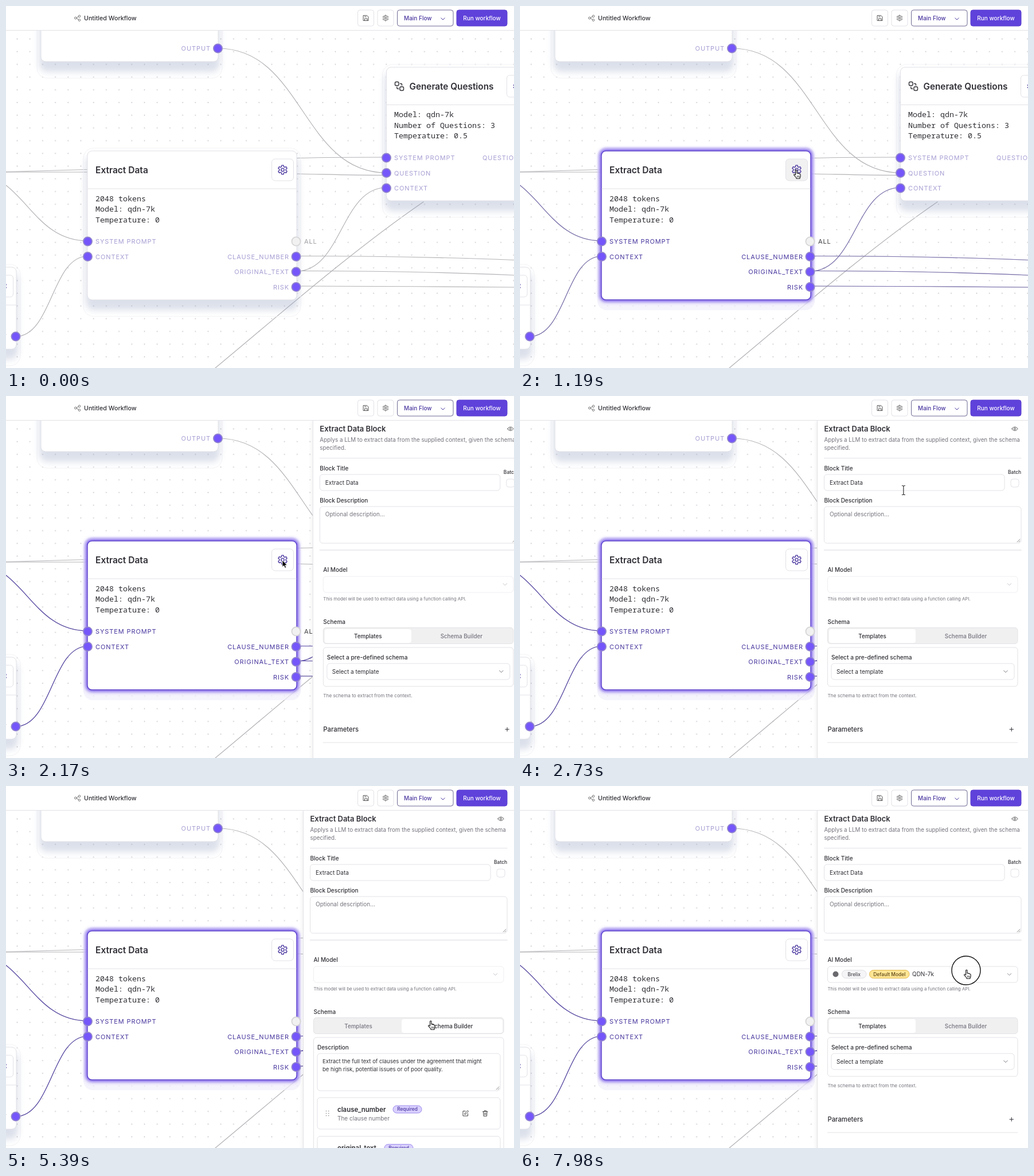
These frames come from a looping animation (886x632 px, 8 s). An HTML page:

```html
<!DOCTYPE html>
<html lang="en">
<head>
<meta charset="utf-8">
<title>Workflow editor</title>
<style>
  html, body { margin: 0; width: 100%; height: 100%; overflow: hidden; background: #fff; }
  svg { display: block; width: 100%; height: 100%; font-family: Inter, sans-serif; }
  .mono { font: 13.33px "Noto Sans Mono", monospace; }
  .label { font-size: 11px; letter-spacing: .9px; }
  .line { fill: none; stroke-linecap: round; stroke-linejoin: round; }
</style>
</head>
<body>
<svg id="stage" viewBox="0 0 886 632" preserveAspectRatio="none"></svg>
<script>
const INK = '#2f2f36', GREY = '#74747e', BORDER = '#e2e2e8', VIOLET = '#4b379f';
const PALE_LABEL = [167, 158, 211], DARK_LABEL = [73, 54, 158];

// ---- drawing helpers ----
const text = (x, y, str, size = 10, weight = 400, fill = INK, anchor = 'start') =>
  `<text x="${x}" y="${y}" font-size="${size}" font-weight="${weight}" fill="${fill}" text-anchor="${anchor}">${str}</text>`;
const box = (x, y, x2, y2, r = 5, fill = '#fff', stroke = BORDER, extra = '') =>
  `<rect x="${x}" y="${y}" width="${x2 - x}" height="${y2 - y}" rx="${r}" fill="${fill}" stroke="${stroke}" ${extra}/>`;
const line = (d, stroke = INK, width = 1.1, extra = '') =>
  `<path class="line" d="${d}" stroke="${stroke}" stroke-width="${width}" ${extra}/>`;
const circle = (x, y, r, fill, stroke = 'none', width = 1) =>
  `<circle cx="${x}" cy="${y}" r="${r}" fill="${fill}" stroke="${stroke}" stroke-width="${width}"/>`;
const rule = (x, x2, y, color = BORDER, width = 1) => line(`M${x} ${y}H${x2}`, color, width);
const chevron = (x, y, color = GREY) => line(`M${x - 3.2} ${y - 1.6}l3.2 3.2l3.2-3.2`, color, 1);
const resizer = (x, y) => line(`M${x - 5} ${y}l5-5M${x - 2} ${y}l2-2`, '#777', .8);
const handle = (x, y) => circle(x, y, 7.6, '#7556fa', '#9287cc', 1.8);
const label = (x, y, str, anchor = 'start') =>
  `<text class="label" x="${x}" y="${y + 4}" text-anchor="${anchor}">${str}</text>`;
const mono = (x, y, rows) =>
  rows.map((row, i) => `<text class="mono" x="${x}" y="${y + i * 18.6}" fill="#303036">${row}</text>`).join('');

function gear(cx, cy, r, color, width) {
  const points = [];
  for (let tooth = 0; tooth < 6; tooth++) {
    for (const [offset, k] of [[-.36, .72], [-.2, 1], [.2, 1], [.36, .72]]) {
      const a = tooth * Math.PI / 3 - Math.PI / 2 + offset;
      points.push((cx + r * k * Math.cos(a)).toFixed(2) + ' ' + (cy + r * k * Math.sin(a)).toFixed(2));
    }
  }
  return line('M' + points.join('L') + 'Z', color, width) + circle(cx, cy, r * .33, 'none', color, width);
}

const shadow = (x, y, x2, y2) =>
  box(x - 7, y - 5, x2 + 7, y2 + 29, 18, 'none', '#f4f4f8') +
  box(x - 3, y + 8, x2 + 3, y2 + 18, 14, '#8c9abb', 'none', 'opacity=".3" filter="url(#soft)"');
const node = (x, y, x2, y2) => shadow(x, y, x2, y2) + box(x, y, x2, y2, 8);

// ---- workflow canvas ----
const plainEdges = [
  'M370 74C517 74 517 291 663 291',
  'M0 289.5L142 285.5L507 265.5C560 264.3 610 264 663 264',
  'M0 290H142L507 293C560 294 600 295.5 660 295.5',
  'M365 632C470 545 600 430 728 342',
];
const nodeEdges = [
  'M0 313C45 348 70 410 142 410',
  'M17 577C80 577 80 437 142 437',
  'M507 436.5C650 436.5 750 438 886 443.5',
  'M507 462.5C650 462.5 750 464 886 470',
  'M507 463C585 463 585 317 663 317',
  'M507 489C650 489 750 490 886 491',
];
const edgeGroup = (paths, color) => paths.map(d => line(d, color, 1.2)).join('');

const canvas = `
  <rect width="886" height="632" fill="url(#dots)"/>
  ${edgeGroup([...plainEdges, ...nodeEdges], '#b3b3b7')}
  <g id="hotEdges">${edgeGroup(nodeEdges, '#5a4aa9')}</g>
  ${node(61, -60, 370, 97)}
  ${node(-200, 456, 18, 599)}
  ${rule(0, 18, 522)}${box(-20, 470, 12.5, 508)}
  ${line('M0 486v1M0 491v1', VIOLET, 1.6)}
  ${node(663.5, 107, 960, 340)}
  ${rule(664, 886, 172.5)}${box(873.5, 121, 912, 159)}
  ${line('M885.5 138v.5M885.5 142v.5', VIOLET, 1.6)}
  ${box(678.5, 132.5, 685, 139, 2, 'none', INK, 'stroke-width="1.4"')}
  ${box(687, 141, 693.5, 147.5, 2, 'none', INK, 'stroke-width="1.4"')}
  ${line('M687.5 135.5h1.5q1.5 0 1.5 1.5v1.5M681.8 141.5v1.5q0 1.500 1.500 1.500h1.500', INK, 1.4)}
  ${text(703.5, 145.5, 'Generate Questions', 15.3, 600)}
  ${mono(677, 194, ['Model: qdn-7k', 'Number of Questions: 3', 'Temperature: 0.5'])}
  <g fill="rgb(${PALE_LABEL})">
    ${label(357, 74, 'OUTPUT', 'end')}${label(-6, 577, 'T')}
    ${label(677, 265, 'SYSTEM PROMPT')}${label(677, 291.5, 'QUESTION')}
    ${label(677, 318, 'CONTEXT')}${label(831, 265, 'QUESTIONS')}
  </g>
  ${handle(369.5, 74)}${handle(17, 577)}
  ${handle(663.5, 265)}${handle(663.5, 291.5)}${handle(663.5, 318)}

  <g id="restShadow">${shadow(142, 253, 507, 513)}</g>
  <g id="glow">
    ${box(135, 246, 514, 531, 16, '#f1eefb', 'none', 'opacity=".7"')}
    ${box(139, 250, 510, 516, 10, '#6a4be6', 'none', 'filter="url(#halo)"')}
  </g>
  ${box(142, 253, 507, 513, 8)}
  <g id="hotBorder">${box(142, 253, 507, 513, 8, 'none', '#5b3fce', 'stroke-width="1.4"')}</g>
  ${rule(143, 506, 319)}
  ${text(156, 291.5, 'Extract Data', 15.5, 600)}
  <g id="gearButton">${box(463.5, 267, 501.5, 305, 6, 'inherit')}</g>
  ${gear(482.500, 286, 8, VIOLET, 1.4)}
  ${mono(156, 340.5, ['2048 tokens', 'Model: qdn-7k', 'Temperature: 0'])}
  <g id="nodeLabels">
    ${label(156, 411, 'SYSTEM PROMPT')}${label(156, 437.5, 'CONTEXT')}
    ${label(494, 437.5, 'CLAUSE_NUMBER', 'end')}${label(494, 464, 'ORIGINAL_TEXT', 'end')}
    ${label(494, 490.5, 'RISK', 'end')}
  </g>
  <g id="allLabel">${label(520, 411, 'ALL')}</g>
  ${handle(142.500, 411)}${handle(142.500, 437.5)}
  ${circle(506, 411, 7.6, '#f1f1f1', '#d6d6d6', 1.8)}
  ${[437.5, 464, 490.5].map(y => handle(506, y)).join('')}`;

// ---- toolbar ----
const toolbar = `
  <rect width="886" height="43" fill="#fff"/>${rule(0, 886, 42.5)}
  ${line('M123 20.500C126 20.500 125 17.500 127 17.500M123 21.500C126 21.500 125 24.800 127 24.800', '#666', .9)}
  ${circle(121.3, 21, 1.8, '#fff', '#666', .9)}${circle(128, 17.8, 1.8, '#fff', '#666', .9)}${circle(128, 24.6, 1.8, '#fff', '#666', .9)}
  ${text(136, 25, 'Untitled Workflow', 10.7, 500)}
  ${box(613.5, 7, 641.5, 35, 4)}${box(648, 7, 676, 35, 4)}
  ${line('M623.500 16.500h6l2.500 2.500v6.500h-8.500zM625.500 25.500v-3.500h4.500v3.500M625.500 18.800h3', '#555', 1)}
  ${gear(662, 21, 4.9, '#555', 1)}
  ${box(682.5, 7, 780, 35, 4, '#fff', '#6d6993')}
  ${text(694, 24.500, 'Main Flow', 10, 500, VIOLET)}${chevron(762, 22.500, VIOLET)}
  ${box(786, 7, 874, 35, 4, '#5f42da', '#5a3cd0')}
  ${text(830, 24.500, 'Run workflow', 10, 500, '#fff', 'middle')}`;

// ---- settings panel ----
const pill = (x, x2, y, y2, str, fill, stroke, color, weight) =>
  box(x, y, x2, y2, (y2 - y) / 2, fill, stroke) + text((x + x2) / 2, y2 - 4, str, 8.4, weight, color, 'middle');

const field = (y, name, pillX, note) => `
  ${box(543, y, 862, y + 55)}
  ${[0, 1].map(c => [0, 1, 2].map(r => circle(558.5 + c * 4.2, y + 23.5 + r * 4, .8, '#888')).join('')).join('')}
  ${text(578, y + 24.5, name, 11.4, 600)}
  ${pill(pillX, pillX + 50, y + 14, y + 27, 'Required', '#d9d0ff', '#9f8cec', VIOLET, 500)}
  ${text(578, y + 39.5, note, 10, 400, GREY)}
  ${line(`M801 ${y + 23.500}h-4v8.500h8.500v-4M800 ${y + 29}l.4-2l4.600-4.600l1.600 1.600l-4.600 4.600z`, '#444', 1)}
  ${line(`M831.500 ${y + 24.500}h8.500M834 ${y + 24.500}v-1.700h3.500v1.700M832.500 ${y + 24.500}l.5 7.800h5.500l.5-7.800M834.800 ${y + 27}v3M836.800 ${y + 27}v3`, '#444', 1)}`;

const templatesTab = `
  ${box(536.5, 439, 868, 507)}
  ${text(543, 459.5, 'Select a pre-defined schema', 10.2, 500)}
  ${box(543, 467, 862, 495)}${text(552, 484.5, 'Select a template')}${chevron(847, 481)}
  ${text(536.5, 526, 'The schema to extract from the context.', 8.2, 400, GREY)}
  ${text(536.5, 586, 'Parameters', 11.3, 500)}
  ${line('M854 582h6.500M857.250 578.750v6.500', INK, 1)}
  ${rule(536.5, 868, 605)}`;

const builderTab = `
  ${box(536.5, 439, 868, 720)}
  ${text(543, 459.5, 'Description', 10, 500)}
  ${box(543, 467, 862, 532)}${resizer(860, 530)}
  ${text(552, 484, 'Extract the full text of clauses under the agreement that might', 9.5)}
  ${text(552, 498, 'be high risk, potential issues or of poor quality.', 9.5)}
  ${field(544, 'clause_number', 675, 'The clause number')}
  ${field(611.5, 'original_text', 660, 'The original text')}`;

const tabBar = builder => `
  ${builder ? box(690, 407, 866, 431, 4, '#fff', 'none') : box(539, 407, 690, 431, 4, '#fff', 'none')}
  ${text(614.5, 422.5, 'Templates', 9.8, 500, builder ? GREY : INK, 'middle')}
  ${text(777.5, 422.5, 'Schema Builder', 9.8, 500, builder ? INK : GREY, 'middle')}`;

const panel = `
  ${box(516, 43, 900, 640, 0, '#000', 'none', 'opacity=".05" filter="url(#halo)"')}
  <rect x="518" y="43" width="380" height="600" fill="#fff"/>${line('M518.500 43V632', BORDER, 1)}
  ${text(530.5, 62, 'Extract Data Block', 13, 600)}
  ${line('M858 57.300C860.500 53 865.500 53 868 57.300C865.500 61.500 860.500 61.500 858 57.300Z', '#555', 1)}${circle(863, 57.3, 1.5, 'none', '#555', 1)}
  ${text(530.5, 79.5, 'Applys a LLM to extract data from the supplied context, given the schema', 9.8, 400, GREY)}
  ${text(530.5, 93.5, 'specified.', 9.8, 400, GREY)}
  ${rule(530.5, 874, 108.5)}
  ${text(530.5, 129.5, 'Block Title', 10, 500)}${text(851, 136, 'Batch', 8.5, 500)}
  ${box(530.5, 137, 845, 165)}${text(540, 155, 'Extract Data')}
  ${box(856, 145, 870, 159, 4)}
  ${text(530.5, 185.5, 'Block Description', 10, 500)}
  ${box(530.5, 193, 874, 257)}${text(540, 209.5, 'Optional description…', 10, 400, GREY)}${resizer(872, 255)}
  ${rule(530.5, 874, 269, '#e6e6ea', 1.6)}
  ${text(536.5, 307, 'AI Model', 10, 500)}
  <g id="emptyModel">${box(536.5, 315, 868, 343, 5, '#fff', '#efeff2')}${chevron(853.5, 329, '#c4c4ca')}</g>
  <g id="chosenModel">
    ${box(536.5, 315, 868, 343)}${chevron(853.5, 329, '#8a8a92')}
    ${circle(550.500, 328.5, 5, '#6a6a6e')}
    ${pill(561.5, 604, 321.5, 335.5, 'Brelix', '#f5f5f7', '#dfdfe4', '#45454c', 500)}
    ${pill(609.5, 679, 321.5, 335.5, 'Default Model', '#ffe594', '#dfb84c', '#5b4716', 500)}
    ${text(684, 332.2, 'QDN-7k')}
  </g>
  ${text(536.5, 357, 'This model will be used to extract data using a function calling API.', 7.9, 400, GREY)}
  ${text(536.5, 397.5, 'Schema', 10, 500)}
  ${box(536.5, 404.5, 868, 432.5, 5, '#f0f0f1', '#e3e3e6')}
  <g id="templates">${tabBar(false)}${templatesTab}</g>
  <g id="builder">${tabBar(true)}${builderTab}</g>`;

// ---- pointer shapes, drawn around their hot spot ----
const pointer = `
  <g id="pointer">
    <path id="arrow" d="M0 0V11.500L2.700 9L4.600 13.300L6.600 12.400L4.800 8.300H8.300Z" stroke="#fff" stroke-width=".8"/>
    <g id="hand">
      <path d="M-1.400 .2Q-1.400-1-.2-1Q1-1 1 .2V5Q2.800 4.400 3.300 5.500Q4.800 5.100 5.300 6.100Q7.100 6 7.100 7.500V10Q7.100 12 6 13V14.300H0V13L-4 8.400Q-4.800 7.200-3.600 6.700Q-2.600 6.500-1.400 8Z" fill="#fff" stroke="#111" stroke-width="1.100" stroke-linejoin="round"/>
      ${line('M1.500 9.500v2.500M3.300 9.500v2.500M5 9.500v2.500', '#111', .7)}
    </g>
    <path id="beam" class="line" d="M-2.500-8Q0-8 0-6.500Q0-8 2.500-8M0-6.500V6.500M-2.500 8Q0 8 0 6.500Q0 8 2.500 8" stroke="#222" stroke-width="1.100"/>
  </g>`;

document.getElementById('stage').innerHTML = `
  <defs>
    <pattern id="dots" x="8.4" y="46.4" width="22.2" height="22.2" patternUnits="userSpaceOnUse">${circle(11.1, 11.1, .95, '#c3c3cb')}</pattern>
    <filter id="soft" x="-20%" y="-20%" width="140%" height="150%"><feGaussianBlur stdDeviation="6"/></filter>
    <filter id="halo" x="-20%" y="-20%" width="140%" height="140%"><feGaussianBlur stdDeviation="3.2"/></filter>
  </defs>
  ${canvas}
  <g id="panel">${panel}</g>
  ${toolbar}
  <circle id="ring" cx="778" cy="322" fill="#fff" fill-opacity=".6" stroke="#111" stroke-width="1.400"/>
  ${pointer}`;

// ---- motion ----
const el = {};
document.querySelectorAll('#stage [id]').forEach(e => el[e.id] = e);

const clamp = v => Math.max(0, Math.min(1, v));
const span = (t, from, to) => clamp((t - from) / (to - from));
const easeInOut = p => p < .5 ? 4 * p ** 3 : 1 - 4 * (1 - p) ** 3;
const mix = (a, b, p) => `rgb(${a.map((v, i) => Math.round(v + (b[i] - v) * p))})`;
const show = (element, visible) => element.style.display = visible ? '' : 'none';

// cubic-bezier(.4, 0, .2, 1), solved by bisection
function glide(x) {
  let lo = 0, hi = 1;
  for (let i = 0; i < 24; i++) {
    const s = (lo + hi) / 2, u = 1 - s;
    if (1.2 * u * u * s + .6 * u * s * s + s ** 3 < x) lo = s; else hi = s;
  }
  return 3 * (1 - lo) * lo * lo + lo ** 3;
}

const START = [832, 24];
const moves = [ // from, to, x, y
  [210, 1050, 482, 287],
  [2380, 2880, 691, 150],
  [3220, 3850, 656, 368],
  [4700, 5180, 741, 411],
  [5360, 5950, 638.500, 421],
  [7430, 7920, 779, 322],
];
function pointerAt(t) {
  let [x, y] = START;
  for (const [from, to, toX, toY] of moves) {
    const p = easeInOut(span(t, from, to));
    x += (toX - x) * p;
    y += (toY - y) * p;
  }
  return [x, y];
}

const PANEL_OPEN = 1645, MODEL_LOADED = 5530, TO_BUILDER = 5200, TO_TEMPLATES = 6400;

function draw(t) {
  const [x, y] = pointerAt(t);
  const inside = (x1, y1, x2, y2) => x >= x1 && x <= x2 && y >= y1 && y <= y2;

  const hover = span(t, 830, 1040), edgeHover = span(t, 840, 1400);
  el.glow.style.opacity = el.hotBorder.style.opacity = hover;
  el.restShadow.style.opacity = 1 - hover;
  el.hotEdges.style.opacity = edgeHover;
  el.nodeLabels.style.fill = mix(PALE_LABEL, DARK_LABEL, hover);
  el.allLabel.style.fill = mix([160, 160, 164], [64, 64, 68], hover);

  const onGear = t < 1680 && inside(463, 267, 502, 305);
  el.gearButton.style.fill = onGear ? '#f1f1f2' : '#fff';

  const slide = 368 * (1 - glide(span(t, PANEL_OPEN, PANEL_OPEN + 714)));
  show(el.panel, t > PANEL_OPEN);
  el.panel.setAttribute('transform', `translate(${slide.toFixed(2)} 0)`);

  const builder = t >= TO_BUILDER && t < TO_TEMPLATES;
  show(el.builder, builder);
  show(el.templates, !builder);
  show(el.chosenModel, t >= MODEL_LOADED);
  show(el.emptyModel, t < MODEL_LOADED);

  const panelReady = t > 2360;
  const hand = onGear || inside(786, 7, 874, 35) ||
    panelReady && (inside(536, 404, 868, 433) || t >= MODEL_LOADED && inside(536, 315, 868, 343));
  const beam = panelReady && (inside(530, 137, 845, 165) || inside(530, 193, 874, 257));
  show(el.pointer, t >= 70);
  show(el.hand, hand);
  show(el.beam, beam);
  show(el.arrow, !hand && !beam);
  el.pointer.setAttribute('transform', `translate(${x.toFixed(2)} ${y.toFixed(2)})`);

  show(el.ring, t >= 7900);
  el.ring.setAttribute('r', 25 * span(t, 7880, 7970));
}

function tick() {
  draw(performance.now() % 8000);
  requestAnimationFrame(tick);
}
tick();
</script>
</body>
</html>
```
